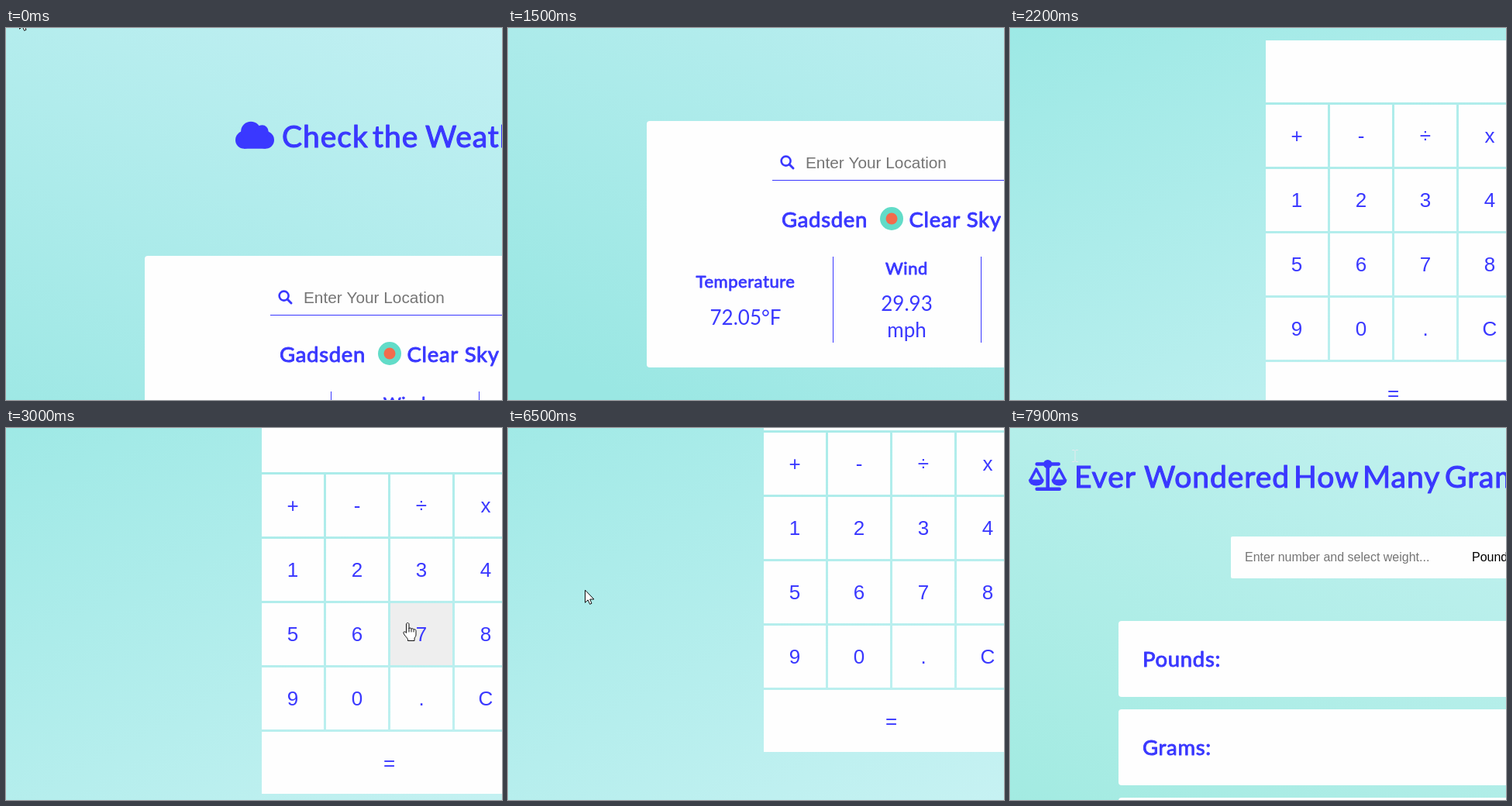
An HTML page with a canvas for the animation above (8 s loop, 640 by 480 pixels).

```html
<!DOCTYPE html>
<html lang="en">
<head>
<meta charset="utf-8">
<title>Weather, calculator and weights</title>
<style>
html, body { margin: 0; width: 100%; height: 100%; overflow: hidden; background: #aeecea; }
canvas { display: block; width: 640px; height: 480px; }
</style>
</head>
<body>
<canvas id="stage" width="640" height="480"></canvas>
<script>
const ctx = document.getElementById('stage').getContext('2d');
const LOOP = 8000, STEP = 100;
const BLUE = '#3a38ff', WHITE = '#fefefe', GREY = '#757575';
const ROUND = 'Lato, sans-serif';
const ARIAL = '"Liberation Sans", Arial, sans-serif';

const CALC_TOP = 732, WEIGHT_TOP = 1467;
const KEYS = ['+-÷x', '1234', '5678', '90.C'];
const CELL = 80, PITCH = 83, CALC_X = 330, KEYS_Y = CALC_TOP + 203;

// [time, page offset]
const SCROLL = [
  [0, 0], [800, 0], [900, 10], [1100, 40], [1200, 40], [1300, 70], [1400, 115],
  [1500, 174], [2000, 835], [2100, 835], [2200, 836], [2600, 875], [5900, 875],
  [6000, 895], [6100, 915], [6400, 915], [6500, 929], [6600, 1010],
  [6900, 1505], [7000, 1547], [LOOP, 1547]
];

// [time, kind, x, y] of the pointer tip
const POINTER = [
  [0, 'arrow', 17, -15], [300, 'arrow', 0, -1], [400, 'none', 0, 0],
  [2700, 'arrow', 90, 228], [2800, 'arrow', 290, 245], [2900, 'hand', 470, 255],
  [3000, 'hand', 518, 251], [3600, 'hand', 560, 251], [3800, 'hand', 570, 251],
  [3900, 'arrow', 577, 251], [4700, 'hand', 579, 251], [4800, 'hand', 588, 251],
  [5400, 'hand', 452, 205], [5500, 'arrow', 240, 212], [5600, 'arrow', 99, 209],
  [7600, 'arrow', 98, 190], [7700, 'arrow', 96, 130], [7800, 'beam', 88, 66],
  [7900, 'beam', 84, 36]
];

function scrollAt(t) {
  const i = SCROLL.findIndex(key => key[0] > t);
  const [t0, y0] = SCROLL[i - 1], [t1, y1] = SCROLL[i];
  return Math.round(y0 + (y1 - y0) * (t - t0) / (t1 - t0));
}

function box(x, y, w, h, r = 0, color = WHITE) {
  ctx.fillStyle = color;
  ctx.beginPath();
  ctx.roundRect(x, y, w, h, r);
  ctx.fill();
}

function disc(x, y, r, color = BLUE) {
  ctx.fillStyle = color;
  ctx.beginPath();
  ctx.arc(x, y, r, 0, Math.PI * 2);
  ctx.fill();
}

function line(points, width, color = BLUE) {
  ctx.strokeStyle = color;
  ctx.lineWidth = width;
  ctx.beginPath();
  points.forEach(([x, y]) => ctx.lineTo(x, y));
  ctx.stroke();
}

function text(str, x, y, size, { font = ROUND, color = BLUE, align = 'left', bold = 0 } = {}) {
  ctx.font = `${size}px ${font}`;
  ctx.textAlign = align;
  ctx.fillStyle = ctx.strokeStyle = color;
  ctx.fillText(str, x, y);
  if (bold) {
    ctx.lineWidth = bold;
    ctx.strokeText(str, x, y);
  }
}

// Slightly bold, loosely set text with soft corners
function heading(str, x, y, size, align) {
  ctx.letterSpacing = `${size * 0.025}px`;
  text(str, x, y, size, { align, bold: size * 0.015 + 0.5 });
  ctx.letterSpacing = '0px';
}

function sky(top, height, [x0, y0, x1, y1], dark, light) {
  const g = ctx.createLinearGradient(x0, top + y0, x1, top + y1);
  g.addColorStop(0, dark);
  g.addColorStop(1, light);
  ctx.fillStyle = g;
  ctx.fillRect(0, top, 640, height);
}

function cloud() {
  disc(307.3, 144.4, 11.3);
  disc(334.8, 144.5, 11.2);
  disc(316, 133.6, 12.9);
  disc(330.5, 133.5, 8.2);
  box(307, 134, 28, 21.7, 0, BLUE);
}

function weather() {
  sky(0, CALC_TOP, [-229, 468, 176, -360], '#9ae7e3', '#c8f1f5');
  cloud();
  heading('Check', 356, 154, 39);
  heading('the', 473, 154, 39);
  heading('Weather', 541, 154, 39);

  box(179, 294, 500, 318, 4);
  ctx.strokeStyle = BLUE;
  ctx.lineWidth = 2.6;
  ctx.beginPath();
  ctx.arc(358.6, 345.6, 6, 0, Math.PI * 2);
  ctx.stroke();
  line([[363.3, 350.3], [368, 355]], 3);
  text('Enter Your Location', 384, 355, 20.8, { font: ARIAL, color: GREY });
  box(341, 370, 299, 1, 0, BLUE);

  heading('Gadsden', 353, 431, 27.5);
  disc(495, 420, 15, '#62dcc8');
  disc(495, 420, 7.5, '#f26b4c');
  heading('Clear Sky', 517.5, 431, 27.5);

  box(419, 469, 1, 111, 0, BLUE);
  box(610, 469, 1, 111, 0, BLUE);
  heading('Temperature', 306.5, 509, 22, 'center');
  text('72.05°F', 306.5, 557, 26, { align: 'center' });
  heading('Wind', 514.5, 492, 22, 'center');
  text('29.93', 514.5, 539, 26, { align: 'center' });
  text('mph', 514.5, 573, 26, { align: 'center' });
}

function calculator(shown, hand, offset) {
  sky(CALC_TOP, WEIGHT_TOP - CALC_TOP, [-28, 52, 403, 843], '#9ae8e4', '#c8f2f3');
  const label = (str, x, y, align = 'center') =>
    text(str, x, y, 26, { font: ARIAL, align });
  const wide = 4 * CELL + 9;

  box(CALC_X, CALC_TOP + 120, wide, CELL);
  label(shown, 649, CALC_TOP + 169, 'right');
  KEYS.forEach((row, r) => [...row].forEach((key, c) => {
    const x = CALC_X + c * PITCH, y = KEYS_Y + r * PITCH;
    const over = hand && hand.x >= x && hand.x < x + CELL &&
      hand.y + offset >= y && hand.y + offset < y + CELL;
    box(x, y, CELL, CELL, 0, over ? '#eee' : WHITE);
    label(key, x + 40, y + 49);
  }));
  const y = KEYS_Y + 4 * PITCH;
  box(CALC_X, y, wide, CELL);
  label('=', CALC_X + wide / 2, y + 49);
}

function scales(x, y) {
  ctx.save();
  ctx.translate(x, y);
  disc(0, 5.5, 5.6);
  line([[-14, 5.5], [14, 5.5]], 4.4);
  line([[0, 5], [0, 37]], 4.6);
  line([[-14, 37.8], [15, 37.8]], 4.6);
  for (const side of [-14.8, 14.8]) {
    line([[side - 7.5, 26], [side, 12], [side + 7.5, 26]], 3.6);
    ctx.fillStyle = BLUE;
    ctx.beginPath();
    ctx.ellipse(side, 25.5, 10, 8, 0, 0, Math.PI);
    ctx.fill();
  }
  ctx.restore();
}

function weights() {
  const top = WEIGHT_TOP + 80;
  sky(WEIGHT_TOP, 700, [-215, 535, 270, -305], '#9feae0', '#c8f2f2');
  ctx.save();
  ctx.translate(0, top);
  scales(48.7, 41);
  const words = { Ever: 83, Wondered: 173, How: 366, Many: 455, Grams: 561 };
  for (const word in words) heading(word, words[word], 77, 39);

  box(285, 140, 400, 54, 2);
  text('Enter number and select weight...', 303, 172, 16, { font: ARIAL, color: GREY });
  text('Pounds', 596, 172, 16, { font: ARIAL, color: '#000' });
  for (let i = 0; i < 3; i++) box(140, 249 + i * 114, 540, 98, 4);
  heading('Pounds:', 171, 308, 27.5);
  heading('Grams:', 171, 422, 27.5);
  ctx.restore();
}

const SHAPES = {
  arrow: 'M.5 .5V16.3L4.2 12.9L6.6 18.4L9 17.3L6.7 12H11.6Z',
  hand: 'M-1.5 13V2C-1.5 0 2 0 2 2V8C2 6.5 5 6.7 5 8.5C5 7.3 8 7.5 8 9.3' +
    'C8 8.3 11 8.6 11 10.5V16C11 18 9 19.5 9 21V23.5H.5V21.5C-1 19 -4 16.5 -5 13.8' +
    'C-5.6 11.8 -3.5 11 -1.5 13Z',
  grip: 'M2 8V12M5 9V12M8 10V12',
  beam: 'M-3.5 -7.5H-1L0 -6.5L1 -7.5H3.5M0 -6.5V6.5M-3.5 7.5H-1L0 6.5L1 7.5H3.5'
};
for (const name in SHAPES) SHAPES[name] = new Path2D(SHAPES[name]);

function pointer({ kind, x, y }) {
  if (kind === 'none') return;
  ctx.save();
  ctx.translate(x, y);
  ctx.lineWidth = 1;
  ctx.strokeStyle = kind === 'beam' ? '#e4eaee' : '#111';
  if (kind !== 'beam') {
    ctx.fillStyle = '#fff';
    ctx.fill(SHAPES[kind]);
  }
  ctx.stroke(SHAPES[kind]);
  if (kind === 'hand') ctx.stroke(SHAPES.grip);
  ctx.restore();
}

function draw(now) {
  const t = Math.floor(now % LOOP / STEP) * STEP;
  const offset = scrollAt(t);
  const [, kind, x, y] = POINTER.findLast(key => key[0] <= t);
  const mouse = { kind, x, y };
  const shown = t < 3400 ? '' : t < 5100 ? '7' : '78';

  ctx.lineJoin = ctx.lineCap = 'round';
  ctx.save();
  ctx.translate(0, -offset);
  weather();
  calculator(shown, kind === 'hand' && mouse, offset);
  weights();
  ctx.restore();
  pointer(mouse);
}

const start = performance.now();
function tick() {
  draw(performance.now() - start);
  requestAnimationFrame(tick);
}
tick();
</script>
</body>
</html>
```
